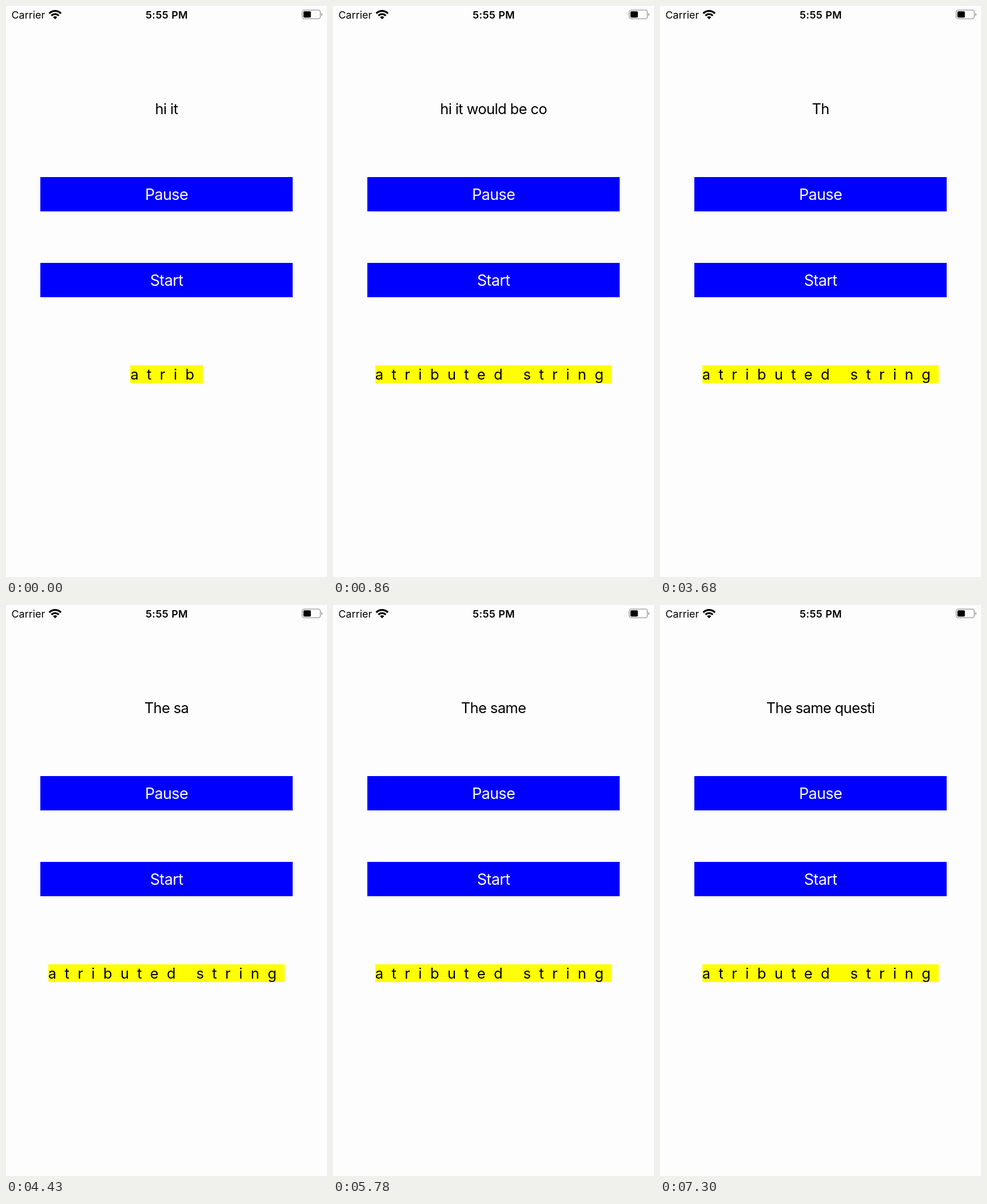
Recreate the animation shown at these times as an HTML page. Size 561x998 px, loop 8000 ms.

```html
<!DOCTYPE html>
<html lang="en">
<head>
<meta charset="utf-8">
<title>Typing labels</title>
<style>
  html, body { margin: 0; width: 100%; height: 100%; overflow: hidden; }
  body {
    position: relative;
    background: #fdfdfd;
    color: #000;
    font: 25.43px/31px Inter, "Noto Sans", sans-serif;
    font-optical-sizing: none;
    letter-spacing: -.6px;
    white-space: pre;
  }
  .stage { position: absolute; left: 0; top: 0; width: 561px; height: 998px; overflow: hidden; }
  .stage > * { position: absolute; }
  .label { left: 0; width: 561px; height: 31px; text-align: center; }
  #plain { top: 164px; }
  #spaced { top: 628px; }
  #spaced span {
    display: inline-block;
    height: 31px;
    background: #ff0;
    letter-spacing: 14.4px;
  }
  .button {
    left: 60px;
    width: 441px;
    height: 60px;
    background: #00f;
    color: #fff;
    font-size: 26.93px;
    line-height: 60px;
    text-align: center;
  }
  .status { left: 0; top: 0; font-size: 17.95px; letter-spacing: 0; }
  .status .time { font-weight: 600; letter-spacing: .4px; }
</style>
</head>
<body>
<div class="stage">
  <svg class="status" width="561" height="32">
    <clipPath id="fan"><path d="M85.8 23.2 69 6.4V0h33.6v6.4z"/></clipPath>
    <text x="9.5" y="22">Carrier</text>
    <g clip-path="url(#fan)" fill="none" stroke="#000" stroke-width="3.2">
      <circle cx="85.8" cy="22.8" r="14.1"/>
      <circle cx="85.8" cy="22.8" r="8.7"/>
      <circle cx="85.8" cy="22.8" r="4.8" fill="#000" stroke="none"/>
    </g>
    <text class="time" x="281" y="22" text-anchor="middle">5:55 PM</text>
    <rect x="517.6" y="7.1" width="31.8" height="15.3" rx="4" fill="none" stroke="#999" stroke-width="1.4"/>
    <rect x="519.8" y="9.2" width="13" height="11" rx="2" fill="#000"/>
    <path d="M551 12.2q2 .6 2 2.6t-2 2.6z" fill="#999"/>
  </svg>
  <div class="label" id="plain"></div>
  <div class="button" style="top:299px">Pause</div>
  <div class="button" style="top:449px">Start</div>
  <div class="label" id="spaced"><span></span></div>
</div>
<script>
  const LOOP = 8000;
  const GREETING = 'hi it would be cool';
  const QUESTION = 'The same question';
  const SPACED = 'atributed string';

  // Each run types one character per listed time, beginning at `count` characters.
  const runs = [
    { text: GREETING, count: 5, times: [0] },
    { text: GREETING, count: 13, times: [50, 220, 430, 650, 860, 3030, 3240] },
    { text: QUESTION, count: 1, times: [3460, 3680, 3890, 4110, 4320, 4430, 5350] },
    { text: QUESTION, count: 8, times: [5780, 6000, 6220, 6430, 6650, 6860, 7080, 7300] }
  ];

  const plain = document.getElementById('plain');
  const spaced = document.querySelector('#spaced span');

  function setText(element, text) {
    if (element.textContent !== text) element.textContent = text;
  }

  function draw(now) {
    const time = now % LOOP;
    const run = runs.findLast(({ times }) => times[0] <= time);
    const typed = run.count + run.times.filter(tick => tick <= time).length - 1;
    const spacedCount = run.text === GREETING ? typed : SPACED.length;
    setText(plain, run.text.slice(0, typed).trimEnd());
    setText(spaced, SPACED.slice(0, spacedCount));
  }

  function frame(now) {
    draw(now);
    requestAnimationFrame(frame);
  }

  draw(0);
  requestAnimationFrame(frame);
</script>
</body>
</html>
```
